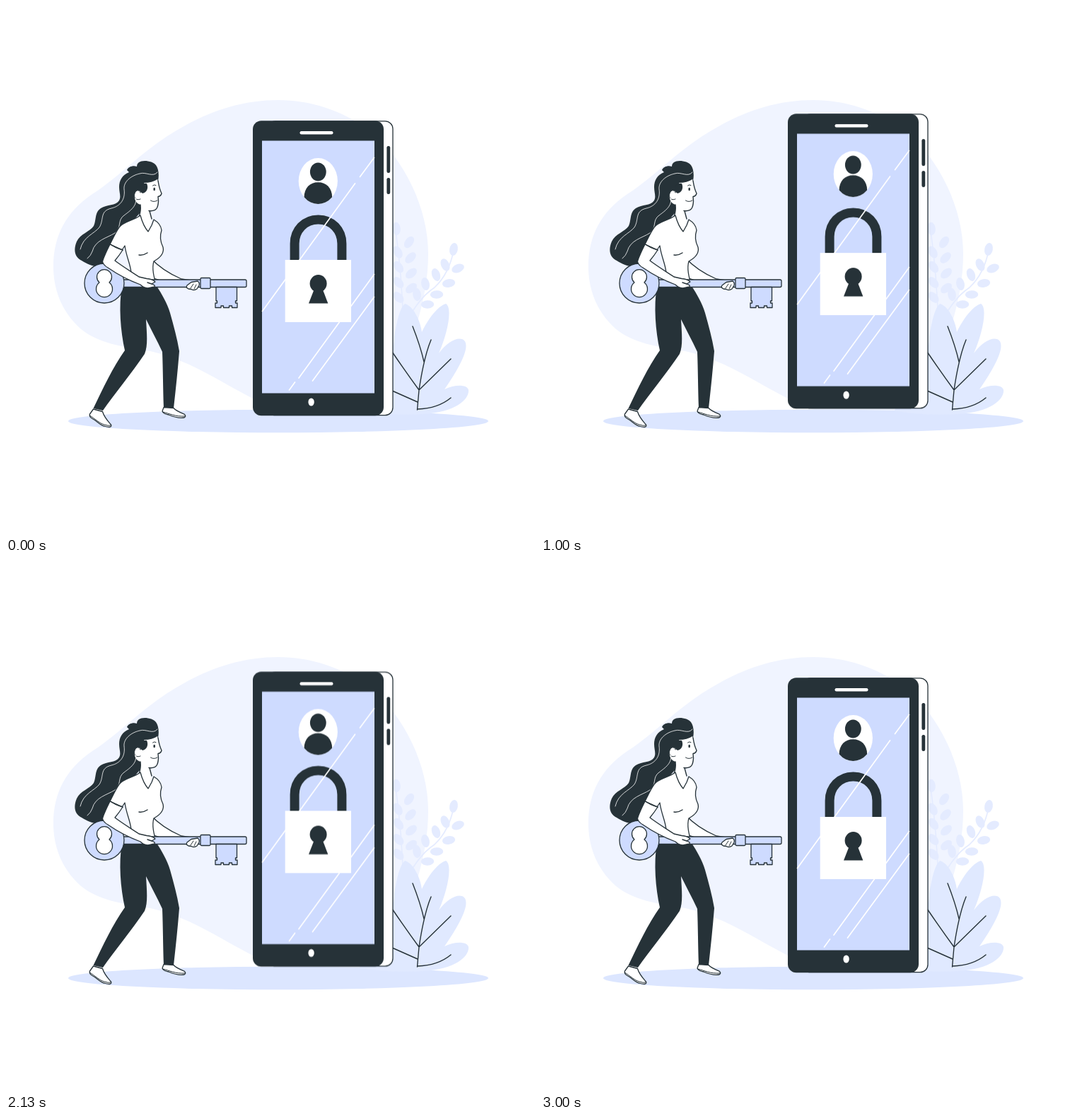
Write an HTML page without scripts that moves like this. It is 748 by 748 pixels and loops after 3040 ms.

```html
<!DOCTYPE html>
<html lang="en">
<head>
<meta charset="utf-8">
<title>Key and phone</title>
<style>
  html, body { margin: 0; width: 100%; height: 100%; overflow: hidden; background: #fff; }
  svg { display: block; width: 100%; height: 100%; }
  .ink { fill: #263238; }
  .white { fill: #fff; }
  .blue { fill: #cedbff; }
  .leaf { fill: #e0e9ff; }
  .line, .thin { fill: none; stroke: #263238; stroke-width: 1.4; stroke-linecap: round; stroke-linejoin: round; }
  .thin { stroke-width: 1; }
  .edge { stroke: #263238; stroke-width: 1.3; stroke-linecap: round; stroke-linejoin: round; }
  .shine { fill: none; stroke: #fff; stroke-width: 1.7; stroke-linecap: round; }
  .strand { fill: none; stroke: #fff; stroke-width: .8; stroke-linecap: round; }
  .phone { animation: float 3.04s linear infinite; }
  /* rises for 1.5 s, sinks for 1.5 s, rests 40 ms */
  @keyframes float {
    0%, 98.684%, 100% { transform: translateY(0); }
    49.342% { transform: translateY(-14.8px); }
  }
</style>
</head>
<body>
<svg viewBox="0 0 748 748">
  <defs>
    <ellipse id="bud" rx="5.8" ry="9.2"/>
    <clipPath id="face"><ellipse cx="441.3" cy="247.5" rx="27.6" ry="32.6"/></clipPath>
  </defs>

  <!-- backdrop -->
  <path fill="#f0f4ff" d="M67 368C67 325 85 291 122 266C158 243 188 210 228 184C276 153 327 133 385 133C448 133 510 161 548 211C578 251 597 302 597 350C597 420 572 466 566 510C560 560 500 580 440 579C397 578 370 566 349 555C300 530 258 500 204 488C165 482 130 477 105 456C77 430 67 399 67 368Z"/>
  <ellipse cx="385" cy="587" rx="297" ry="16.3" fill="#dce6ff"/>

  <!-- plants -->
  <g fill="#e4ebff">
    <path fill="none" stroke="#e4ebff" stroke-width="1.6" d="M562 455Q560 380 550 310M560 460Q580 415 606 398Q627 378 633 345"/>
    <use href="#bud" transform="translate(552 315) rotate(-5)"/>
    <use href="#bud" transform="translate(570 334) rotate(35)"/>
    <use href="#bud" transform="translate(554 348) rotate(-30)"/>
    <use href="#bud" transform="translate(572 356) rotate(45)"/>
    <use href="#bud" transform="translate(555 369) rotate(-35)"/>
    <use href="#bud" transform="translate(573 378) rotate(50)"/>
    <use href="#bud" transform="translate(555 391) rotate(-40)"/>
    <use href="#bud" transform="translate(573 399) rotate(52)"/>
    <use href="#bud" transform="translate(555 412) rotate(-42)"/>
    <use href="#bud" transform="translate(633 344) rotate(10)"/>
    <use href="#bud" transform="translate(621 366) rotate(-25)"/>
    <use href="#bud" transform="translate(639 371) rotate(68)"/>
    <use href="#bud" transform="translate(608 380) rotate(-20)"/>
    <use href="#bud" transform="translate(626 392) rotate(80)"/>
    <use href="#bud" transform="translate(593 393) rotate(-12)"/>
    <use href="#bud" transform="translate(609 408) rotate(88)"/>
    <use href="#bud" transform="translate(581 408) rotate(-8)"/>
    <use href="#bud" transform="translate(596 422) rotate(88)"/>
  </g>
  <path class="leaf" d="M500 572L530 500Q550 488 549 468Q555 428 564 421C576 424 586 445 588 461C597 442 611 424 622 421C632 427 624 464 612 491C624 475 640 466 648 473C656 482 644 507 620 542C635 535 652 535 654 543C655 556 637 574 590 577Q540 580 500 572Z"/>
  <path class="line" d="M581.500 571Q583 554 584 543L629 499M575 453Q586 481 591 503M601 472Q591 496 584 543Q565 517 546 489M546 544L582 560M582 570Q611 569 629 554"/>

  <!-- phone -->
  <g class="phone">
    <rect class="white edge" x="370" y="162.8" width="177" height="415.9" rx="11"/>
    <rect class="ink" x="349" y="162.2" width="185" height="417" rx="12"/>
    <path class="blue" d="M362 190.500H521V547.500H362Z"/>
    <rect class="white" x="415.5" y="177" width="47" height="4.4" rx="2.2"/>
    <ellipse class="white" cx="431.6" cy="560" rx="4.2" ry="5.6"/>
    <rect class="ink" x="538.4" y="198" width="4.8" height="38" rx="2.2"/>
    <rect class="ink" x="538.4" y="243" width="4.8" height="23" rx="2.2"/>

    <ellipse class="white" cx="441.3" cy="247.5" rx="27.6" ry="32.6"/>
    <g class="ink" clip-path="url(#face)">
      <ellipse cx="441.3" cy="234.5" rx="11.4" ry="13"/>
      <path d="M421.500 282V271C421.500 257 430 249.300 441.300 249.300S461.200 257 461.200 271V282Z"/>
    </g>

    <path fill="none" stroke="#263238" stroke-width="13" d="M408.100 360V336C408.100 317 422 302 441.500 302S474.900 317 474.900 336V360"/>
    <path class="white" d="M394.700 359H488V447H394.700Z"/>
    <ellipse class="ink" cx="441.6" cy="392.4" rx="12" ry="12.4"/>
    <path class="ink" d="M436 400H447.500L455.300 420.500H428Z"/>
    <path class="shine" d="M520.500 214.500L500.500 241.500M493.500 251L362.500 431.500M520.500 379.500L414 526M408.500 532L400.500 543M520.500 411.500L433.500 530"/>
  </g>

  <!-- hair, legs, shoes -->
  <path class="ink" d="M215 247C217 237 215 229 212 225C208 219 193 217 188 221Q185 223 185 227C180 225 173 227 171 232L174 235C164 239 160 247 160 256C160 264 163 269 160 275C155 283 143 280 134 286C125 292 128 303 124 311C119 319 105 322 100 333C95 345 97 355 107 360C117 366 128 371 140 367L166 330C168 317 180 303 190 292L205 262Z"/>
  <path class="ink" d="M164 396H213C220 407 228 420 232 434C237 452 242 470 245 488C243 514 240 542 237 569H223C222 540 222 516 221 489C213 472 205 457 198 443C199 463 201 480 196 492C177 520 154 548 137 572L123.500 569C137 541 151 511 168 487C162 460 159 424 164 396Z"/>
  <path class="white edge" d="M123.500 570L118.500 577Q117 581 123 584C129 587 132 592 139 594C145 596 150 596 148.500 592C145 588 139 582 136.500 573.500ZM223 567.500L221 573Q223 577 230 578C237 581 245 583.500 252 582Q255.500 580 252 577C247 575 241 573 237 568.500Z"/>
  <path class="thin" d="M118.500 579C125 583 132 590 139 592Q145 594 148 593M221.500 574C231 576 239 581 253 580"/>

  <!-- head -->
  <path class="white" d="M214 245C216 250 216 255 220 265Q219 269 215 269.500L215 276C215 284 213 291 203 290L206 306L201 319L188 298Q191 289 190 281C181 278 179 265 185 261Q189 260 191 264C200 258 197 252 195 250Q207 250 214 245Z"/>
  <path class="line" d="M215 247C216 254 217 259 220 265Q219 269 215 269.500L215.500 276C215 285 213 291 202 289.500M203 290L206 301M190 281Q191 290 188 298"/>
  <path class="thin" d="M190 273C181 277 179 265 185 261Q189 260 190 264M207.500 254Q209.500 252 212 253.500M204.500 275Q209 278 214 275"/>
  <path class="ink" d="M190 262C188 254 193 250 199 251C202 257 199 264 193 265Z"/>
  <ellipse class="ink" cx="209.700" cy="259" rx="1.300" ry="2.300"/>
  <path class="strand" d="M214 235C208 243 198 234 189 237C176 240 166 249 167 259C169 273 162 283 149 286C132 290 139 302 132 313C125 322 109 326 105 344M183 270C187 282 175 290 167 296C157 303 164 313 154 321C143 328 126 331 122 347Q120 353 115 357"/>

  <!-- far arm -->
  <path class="white edge" d="M204 356C216 369 234 380 248 386L268 389L273 394L267 401L257 398C241 394 220 390 204 383Z"/>

  <!-- shirt -->
  <path class="white edge" d="M190 296C180 304 167 304 160 313C155 320 151 329 147 337L164 345L168 339C170 354 176 365 177 377V397H213C209 383 206 371 209 361C218 356 224 349 222 341C218 333 217 326 220 317C219 309 214 305 209 302L206 310L201 319Q194 311 190 296Z"/>
  <path class="line" d="M188 352Q194 353 200 349"/>

  <!-- key -->
  <g class="blue edge">
    <path d="M164 387H276V397.500H164Z"/>
    <path d="M288 387H338Q340 387 340 389V395.500Q340 397.500 338 397.500H288Z"/>
    <rect x="275" y="384.500" width="14" height="15" rx="1.500"/>
    <path d="M297 397.500H326.500V417H324.500V420H327V426.500H319.500V424H315.500V426.500H307.500V424H304V426.500H296V420H298.500V417H297Z"/>
    <circle cx="139" cy="392" r="28"/>
  </g>
  <path class="white edge" d="M132 391A10.500 10.500 0 1 1 146 391A11.500 11.500 0 1 1 132 391Z"/>

  <!-- near arm and hands -->
  <path class="white edge" d="M147 337C143 345 139 353 136.500 361Q137 366 144 370C157 379 174 388 190 394Q196 400 203 398.500L210 397Q212 395 206 393L211 390Q207 386 199 385.500L188 383C176 375 163 367 154 360Q160 353 165 345Z"/>
  <path class="line" d="M146.500 336Q154 342 165 345M200 391L206 393"/>
  <path class="white edge" d="M256 395L262 390.500L271 389Q274 391 273 395L270 400Q266 403 262 400.500L258 400Q254 398 256 395Z"/>
  <path class="thin" d="M261 399L265 393M266 400L269 394"/>
</svg>
</body>
</html>
```
